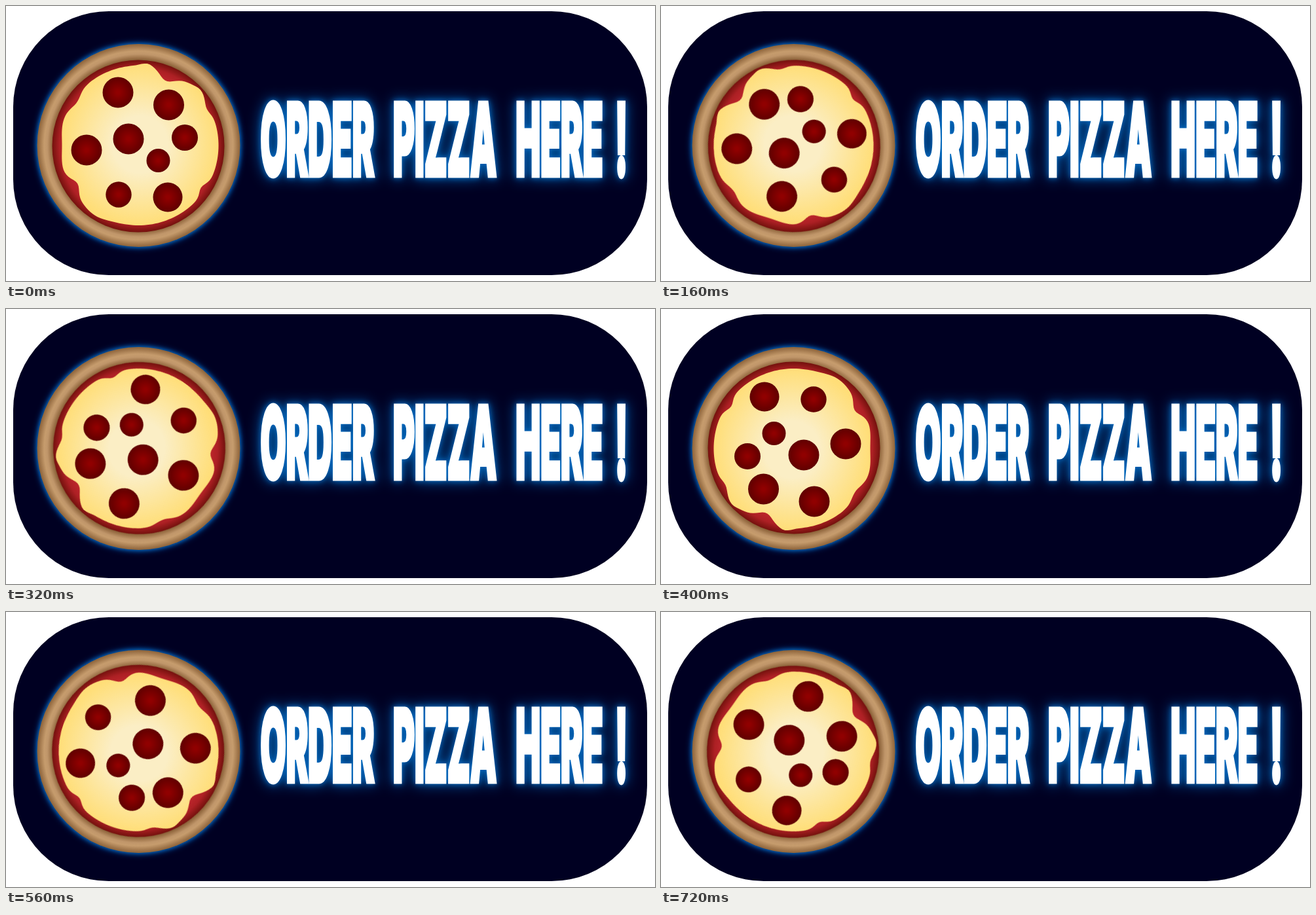
These frames come from a looping animation (991x420 px, 800 ms). An HTML page:

```html
<!DOCTYPE html>
<html lang="en">
<head>
<meta charset="utf-8">
<title>Order pizza here</title>
<style>
  html, body { margin: 0; width: 100%; height: 100%; overflow: hidden; background: #fff; }
  svg { display: block; width: 991px; height: 420px; }
  .crust { filter: drop-shadow(0 0 3px #06b) drop-shadow(0 0 4px #0059b3); }
  .topping { transform-origin: 202.5px 213px; animation: spin 800ms steps(10) infinite; }
  .sign { filter: drop-shadow(0 0 4px #006cc4) drop-shadow(0 0 10px #00549f); }
  .sign text {
    font: 900 152px Inter, "Open Sans", sans-serif;
    text-anchor: middle;
    fill: #fff; stroke: #fff; stroke-width: 7px;
  }
  @keyframes spin { to { transform: rotate(-360deg); } }
</style>
</head>
<body>
<svg viewBox="0 0 991 420">
  <defs>
    <radialGradient id="crust">
      <stop offset=".845" stop-color="#8c6239"/>
      <stop offset=".9" stop-color="#c0966a"/>
      <stop offset=".93" stop-color="#c69c6d"/>
      <stop offset="1" stop-color="#8c6239"/>
    </radialGradient>
    <radialGradient id="sauce">
      <stop offset=".8" stop-color="#c1272d"/>
      <stop offset=".91" stop-color="#ad2024"/>
      <stop offset="1" stop-color="#74110d"/>
    </radialGradient>
    <radialGradient id="cheese">
      <stop offset=".35" stop-color="#fbeec5"/>
      <stop offset="1" stop-color="#ffde78"/>
    </radialGradient>
    <radialGradient id="meat">
      <stop offset=".1" stop-color="#900000"/>
      <stop offset="1" stop-color="#600000"/>
    </radialGradient>
  </defs>

  <rect x="11" y="8" width="968" height="403" rx="146" fill="#000022"/>

  <circle class="crust" cx="202.5" cy="213" r="155" fill="url(#crust)"/>
  <g class="topping">
    <circle cx="202" cy="214" r="131.5" fill="url(#sauce)"/>
    <path id="melt" transform="translate(202.5 213)" fill="url(#cheese)"/>
    <g fill="url(#meat)">
      <circle cx="171" cy="132" r="23.5"/>
      <circle cx="248.5" cy="151" r="23.5"/>
      <circle cx="123" cy="220" r="23.5"/>
      <circle cx="187" cy="203" r="23.5"/>
      <circle cx="273" cy="201" r="20"/>
      <circle cx="232.5" cy="236" r="18"/>
      <circle cx="172" cy="288" r="19.7"/>
      <circle cx="247" cy="292" r="22.5"/>
    </g>
  </g>

  <g class="sign">
    <text transform="translate(475.5 259) scale(.332 1)">ORDER</text>
    <text transform="translate(670 259) scale(.332 1)">PIZZA</text>
    <text transform="translate(845 259) scale(.332 1)">HERE</text>
    <text transform="translate(939.5 259) scale(.332 1)">!</text>
  </g>
</svg>
<script>
  // Ripples of the cheese rim: angle in degrees, height, width in degrees
  const ripples = [
    [-145, -7, 9], [-84, 4, 6], [-67, -15, 9], [-42, 5, 7], [-28, -4, 6],
    [34, -7, 6], [122, 4, 11], [148, -12, 8], [180, -5, 14]
  ];

  function radius(angle) {
    return ripples.reduce((r, [at, height, width]) => {
      const gap = (angle - at + 540) % 360 - 180;
      return r + height * Math.exp(-((gap / width) ** 2));
    }, 122);
  }

  let d = "";
  for (let angle = 0; angle < 360; angle += 2) {
    const r = radius(angle), a = angle * Math.PI / 180;
    d += (d ? "L" : "M") + (r * Math.cos(a)).toFixed(2) + " " + (r * Math.sin(a)).toFixed(2);
  }
  document.getElementById("melt").setAttribute("d", d + "Z");
</script>
</body>
</html>
```
